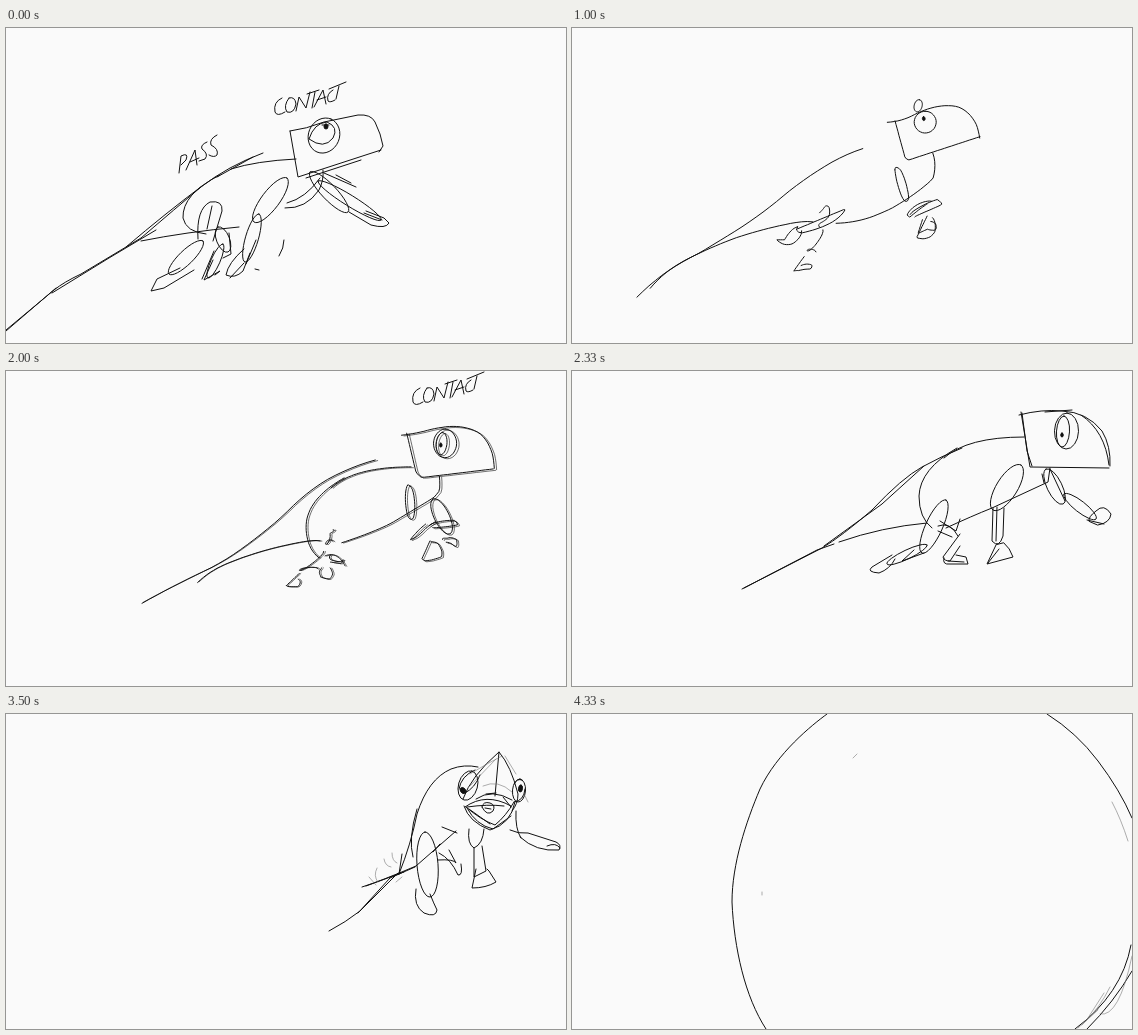
Animation of 560x315 px, one loop 4.5 s. Source, as an HTML page:

```html
<!DOCTYPE html>
<html lang="en">
<head>
<meta charset="utf-8">
<title>Lizard walk test</title>
<style>
html,body{margin:0;width:100%;height:100%;overflow:hidden;background:#fafafa}
svg{display:block;width:100vw;height:100vh}
path,ellipse{fill:none;stroke:#111;stroke-width:1;stroke-linecap:round;stroke-linejoin:round}
#dots{fill:#111}
#soft{stroke-width:.6}
#faint{stroke:#777;stroke-width:.6}
#tongue{fill:#fafafa}
</style>
</head>
<body>
<svg viewBox="0 0 560 315">
  <g id="lizard">
    <path id="soft"/><path id="ink"/><path id="dots"/><path id="faint"/>
  </g>
  <path id="tongueStem"/><ellipse id="tongue"/>
  <path id="contact" aria-label="CONTACT"/>
  <path id="pass" aria-label="PASS"/>
</svg>
<script>
const $ = id => document.getElementById(id);
const LOOP = 4500;

const CONTACT = 'M276 70Q267 74 269 84Q271 89 279 84M283 70Q277 78 281 84Q288 86 290 76Q289 68 283 70' +
  'M290 83L293 69L300 80L304 64M301 66L313 62M309 64L306 80M308 79L317 62L320 76M311 72L320 69' +
  'M327 62Q320 66 322 73Q324 75 329 72M323 61L340 54M333 58L330 71';
const PASS = 'M173 145L175 128Q183 124 180 132L175 137M180 142L189 122L191 137M184 134L193 130' +
  'M201 114Q194 117 196 121Q203 126 199 131L193 133M211 107Q203 111 205 117Q213 121 211 127Q208 130 203 127';

// Ellipse whose long axis runs between two points
function oval(x1, y1, x2, y2, w) {
  const dx = x2 - x1, dy = y2 - y1;
  const arc = `A${Math.hypot(dx, dy) / 2} ${w / 2} ${Math.atan2(dy, dx) * 180 / Math.PI} 1 1 `;
  return `M${x1} ${y1}${arc}${x2} ${y2}${arc}${x1} ${y1}Z`;
}

const poses = [
  {
    tail: 'M0 302L48 262Q58 254 75 246L135 210Q170 180 195 159Q222 138 257 125',
    under: 'M135 213Q180 204 233 199',
    back: 'M225 141Q250 133 290 131',
    rump: 'M214 147Q176 166 177 190Q180 204 200 206',
    belly: 'M279 180Q300 181 313 162Q318 152 317 142',
    head: 'M284 103L292 149L375 122',
    crown: 'M284 103Q300 101 318 94L352 87Q365 86 369 94Q375 106 377 118L373 124',
    eye: oval(325, 91, 311, 124, 31),
    pupil: oval(320, 96, 320, 101, 4),
    nearArm: oval(281, 150, 248, 194, 18),
    nearFore: oval(253, 186, 239, 234, 13),
    nearHand: 'M238 221Q222 235 220 247Q229 251 237 243L244 225',
    farArm: oval(304, 144, 342, 184, 15),
    farFore: oval(312, 153, 375, 192, 11),
    farHand: 'M343 184L365 197Q380 201 383 195L378 190L360 183',
    nearThigh: 'M192 211Q190 181 204 174Q217 172 216 183L207 213',
    nearShin: oval(197, 213, 163, 246, 14),
    nearFoot: 'M174 240L151 251L145 263L158 260L188 242',
    farThigh: oval(212, 199, 222, 224, 13),
    farShin: oval(217, 216, 202, 250, 9),
    farFoot: 'M207 232L198 252L214 243L209 247',
    more: 'M0 303L50 260M46 265L103 230L150 202M120 219Q160 185 196 158M211 149L247 129M300 150L355 132' +
      'M278 212Q278 220 273 228M249 241l4 1M281 175Q300 170 314 150M318 145L350 159M330 147L345 155' +
      'M223 205L225 226L217 230M196 251L208 223M250 212L240 236M358 185L376 192M206 178L201 201' +
      'M303 111Q308 95 321 94Q333 99 327 110Q318 122 303 111M316 97L323 97M224 250L238 235'
  },
  {
    tail: 'M22 297Q34 270 48 259Q58 248 106 225Q150 201 185 170Q200 155 216 145',
    under: 'M44 262Q70 240 130 215Q170 202 206 198',
    back: 'M205 152Q228 136 262 126Q285 119 297 119',
    rump: 'M215 145Q190 163 194 185Q196 195 205 198',
    belly: 'M227 204Q250 208 275 198Q315 187 332 165Q336 150 333 139',
    head: 'M294 101L303 148L379 122',
    crown: 'M288 103Q308 98 322 92Q346 85 362 97Q376 108 377 124',
    eye: oval(326, 92, 323, 116, 22),
    pupil: oval(326, 95, 327, 99, 3),
    nearArm: oval(291, 147, 264, 187, 18),
    nearFore: oval(268, 182, 265, 223, 12),
    nearHand: 'M260 220L249 238Q256 243 262 240Q270 232 270 221',
    farArm: 'M323 165Q324 178 335 185Q343 181 341 171L333 140',
    farFore: oval(333, 179, 373, 197, 14),
    farHand: 'M362 194L357 209L375 203L376 195L371 190',
    nearThigh: oval(214, 172, 215, 225, 20),
    nearShin: oval(219, 221, 191, 245, 14),
    nearFoot: 'M191 235Q180 248 180 253L197 254L192 245',
    more: 'M46 260Q60 250 80 237L110 225M189 168L216 145'
  },
  {
    tail: 'M96 249Q125 231 170 211Q215 183 250 152Q290 112 345 103',
    under: 'M103 259Q115 240 135 229Q180 205 240 192Q258 188 266 191',
    belly: 'M291 189Q330 182 350 165L382 140Q386 128 381 115',
    head: 'M344 87L356 122L429 99',
    crown: 'M335 88Q350 89 362 81Q385 68 405 68Q418 69 427 87L430 100',
    eye: oval(374, 77, 374, 97, 22),
    iris: oval(372, 81, 369, 93, 8),
    pupil: oval(370, 84, 370, 88, 2.5),
    nearArm: 'M346 138Q342 126 354 126Q363 128 389 158Q391 171 382 172Q374 170 346 138Z',
    nearFore: 'M418 172Q403 167 386 171L386 161Q405 152 426 167',
    nearHand: 'M424 165L414 189L420 189Q430 187 433 181Q432 169 426 167',
    farFore: 'M342 192Q352 172 361 157L370 160Q352 180 350 196',
    farHand: 'M342 190L338 203L347 198Q350 202 356 202Q356 194 350 196',
    nearThigh: 'M272 194Q270 152 282 152Q290 160 284 185L272 219',
    nearShin: 'M274 188L262 226',
    nearFoot: 'M262 224L250 241Q262 232 274 232Q276 226 270 224Q262 224 256 232',
    farShin: 'M250 208Q246 214 255 214Q290 206 298 190L250 210',
    farFoot: 'M250 208Q243 210 237 221L229 221Q236 228 245 225Q254 219 254 212',
    more: 'M353 123L370 117M363 93Q361 82 370 78M434 167L434 183L438 183M109 243L167 212'
  },
  {
    tail: 'M170 218L250 177Q270 165 300 139Q330 107 350 96Q370 85 390 77',
    under: 'M267 171Q310 156 355 152',
    back: 'M372 87Q395 66 452 66',
    rump: 'M385 77Q348 98 347 125Q347 147 360 157',
    belly: 'M374 157Q400 145 420 137L476 111L478 97',
    head: 'M449 41L458 96L537 97',
    crown: 'M447 44Q470 38 490 40Q515 41 530 60Q539 75 538 95',
    eye: oval(495, 42, 494, 78, 24),
    iris: oval(492, 45, 490, 76, 13),
    pupil: oval(490, 62, 490, 66, 2.5),
    nearArm: oval(449, 94, 421, 139, 21),
    nearFore: 'M421 137L420 170Q427 178 431 165L432 137',
    nearHand: 'M424 174L415 193L441 186Q438 177 432 172Z',
    farArm: oval(474, 98, 491, 133, 15),
    farFore: oval(492, 123, 524, 148, 11),
    farHand: 'M517 150Q516 146 524 140Q532 132 539 143Q538 152 526 154Z',
    nearThigh: oval(374, 129, 350, 182, 17),
    nearShin: oval(355, 174, 315, 193, 9),
    nearFoot: 'M320 184L300 196Q294 201 307 202Q318 198 323 188',
    farThigh: 'M366 155Q378 150 386 165',
    farShin: 'M388 163L371 186Q372 190 378 190L388 175',
    farFoot: 'M372 187Q370 194 378 193L396 193L394 186L384 184',
    more: 'M172 217L245 179L262 173M252 175L310 133L352 95M450 42L455 80L460 95M473 41L500 39' +
      'M509 44Q533 60 537 94M425 136L424 170M416 192L427 178M478 98L493 130M388 148L384 160L368 150' +
      'M352 182L330 190L342 179M470 103L472 112M515 149L532 153M376 190L392 191M366 160L380 166'
  },
  {
    tail: 'M238 182Q275 161 325 141L350 134Q380 110 405 92L438 66',
    under: 'M320 140Q360 136 402 138',
    back: 'M437 74Q452 58 470 59Q485 62 495 66',
    rump: 'M441 74Q395 100 394 138',
    belly: 'M460 125Q485 133 502 122Q512 115 510 100',
    head: 'M466 70Q482 87 489 110L553 55L560 38',
    crown: 'M466 72Q490 50 505 42Q530 28 553 32L560 40',
    eye: oval(507, 38, 502, 62, 21),
    pupil: oval(501, 45, 501, 50, 3),
    nearArm: oval(479, 89, 451, 139, 20),
    nearFore: 'M448 136L454 170L463 166L465 138',
    nearHand: 'M455 168Q452 183 460 183Q466 178 466 164',
    farArm: 'M501 122L504 131L510 130Q512 119 506 105',
    farFore: oval(505, 127, 542, 141, 11),
    farHand: 'M539 133Q545 122 550 130Q551 146 546 151Q536 152 535 147L541 139Z',
    nearThigh: oval(409, 121, 400, 165, 17),
    nearShin: 'M398 162L390 178L383 184L408 160',
    nearFoot: 'M385 178L373 192L386 190Q394 186 395 180',
    farThigh: 'M404 122Q428 150 436 181L433 168L413 126',
    farFoot: 'M423 176Q416 186 425 189Q436 188 437 180Q432 172 424 178',
    more: 'M267 171L322 143L348 135M358 125L416 84L438 62M432 82Q401 104 401 128M437 84Q455 72 472 68' +
      'M487 101L529 100M492 104Q520 72 560 46M490 108L524 73L556 50M495 46L526 27M552 31L549 52' +
      'M500 42L495 56Q502 64 512 59M440 185L438 170M413 141L435 135L427 144M460 67Q482 76 491 112' +
      'M468 122Q490 131 506 117M473 93L459 112M456 140L452 154M407 125L419 150L434 174M399 145L392 136' +
      'M372 193L393 169M512 122L546 128M425 176L423 187M457 169L460 180M534 33L557 30',
    faint: 'M488 106L480 76M482 63L527 35M478 116Q500 121 520 97M441 70Q458 65 488 69M397 132Q396 112 421 86' +
      'M496 92L540 62M500 100L548 55M480 113L525 98M484 70L491 92M455 75Q475 63 489 64'
  },
  {
    tail: 'M323 217Q340 208 354 197L392 159',
    under: 'M356 173Q375 167 410 152',
    back: 'M393 160Q405 130 411 100Q422 65 445 55Q458 50 472 53',
    rump: 'M411 95Q402 125 407 143',
    head: 'M458 92Q463 108 484 116Q505 110 509 88',
    crown: 'M457 85Q465 62 493 38Q505 52 512 80Q512 90 506 97',
    eye: oval(466, 57, 458, 86, 19),
    pupil: oval(455, 74, 459, 79, 5),
    eye2: oval(514, 65, 512, 88, 13),
    pupil2: oval(515, 71, 514, 78, 4),
    nearArm: 'M463 115Q461 130 468 134Q477 130 478 115',
    nearFore: 'M468 134L468 163L480 157L476 132',
    nearHand: 'M470 155L466 174Q480 174 490 168L483 157L481 155',
    farArm: 'M510 97Q509 115 515 124',
    farFore: 'M504 116Q512 120 522 119L550 128Q556 131 553 136Q530 138 514 123',
    farHand: 'M541 132Q550 128 554 134',
    nearThigh: oval(419, 118, 424, 183, 21),
    nearFoot: 'M410 175Q407 192 418 199Q430 204 431 196Q428 190 424 180',
    farThigh: 'M433 139Q445 145 452 161Q457 162 455 150',
    farFoot: 'M432 146Q448 145 450 149L443 136',
    more: 'M493 38L489 82M460 93Q475 106 489 111Q500 102 508 88M459 93Q480 78 505 92M461 93Q482 90 498 92' +
      'M461 94Q470 111 487 115L505 102M463 95L484 110M476 93Q477 87 484 89Q490 91 487 97Q481 103 476 93' +
      'M479 94L485 95M470 85Q486 74 506 86M453 75Q455 62 469 56M459 79Q469 74 474 61M508 70Q511 64 516 66' +
      'M508 88Q518 87 519 75M352 199L384 164L409 153M360 172L398 158M393 160L396 140M410 152L450 117' +
      'M436 113L451 119M427 138L434 130M480 80L490 79M497 83L505 93',
    faint: 'M371 154Q367 162 372 168M378 145Q379 152 385 153M386 139Q386 147 391 149M363 163L370 171' +
      'M390 168L396 163M464 72L490 45M464 60Q480 50 496 42M477 72Q492 65 506 78M499 42L510 60M519 82L522 88'
  },
  {
    tail: 'M255 0C240 11 205 39 188 75C174 108 160 150 160 188C162 234 173 283 194 315',
    back: 'M475 0Q505 19 526 47Q548 76 560 104',
    under: 'M559 231Q550 280 503 315',
    belly: 'M560 257Q542 288 515 315',
    faint: 'M540 88Q549 105 556 127M281 44l4 -4M190 178v3M510 311Q528 294 538 273M514 307L532 279' +
      'M528 300Q547 304 560 242M506 314L526 296'
  }
];

// start ms, pose, blend to the next pose, options
const steps = [
  [0, 0, 0, {label: [0, 0], pass: true}],
  [160, 0, .3], [330, 0, .7], [500, 1, 0],
  [660, 1, .2, {label: [40, -15], rough: true}],
  [830, 1, .33], [1000, 1, .58], [1160, 1, .74],
  [1330, 1, .88, {label: [84, -52], rough: true}],
  [1500, 2, 0], [1660, 2, .2], [1830, 2, .36],
  [2000, 2, .54, {label: [138, -53], rough: true}],
  [2160, 2, .76], [2330, 3, 0],
  [2500, 3, .36, {label: [196, -53], rough: true}],
  [3000, 4, 0], [3160, 4, .35, {rough: true}], [3330, 4, .7], [3500, 5, 0],
  [3660, 5, 0, {move: 'translate(33 -3) scale(.94 1)'}],
  [3830, 5, 0, {move: 'translate(33 -3) scale(.94 1)', tongue: [476, 232, 24], stem: 'M480 92Q466 150 470 212M487 94Q478 150 482 212'}],
  [4160, 5, 0, {move: 'translate(33 -3) scale(.94 1)', tongue: [440, 160, 92]}],
  [4245, 6, 1, {tongue: [362, 172, 217]}],
  [4330, 6, 0]
];

const SAMPLES = 32;
const probe = document.createElementNS('http://www.w3.org/2000/svg', 'path');

function sample(d) {
  probe.setAttribute('d', d);
  const len = probe.getTotalLength();
  return Array.from({length: SAMPLES + 1}, (_, i) => {
    const p = probe.getPointAtLength(len * i / SAMPLES);
    return [p.x, p.y];
  });
}

const toPath = pts => 'M' + pts.map(p => p.map(v => v.toFixed(1)).join(' ')).join('L');
const mix = (a, b, t) => a.map((p, i) => [p[0] + (b[i][0] - p[0]) * t, p[1] + (b[i][1] - p[1]) * t]);

// A part drawn in only one pose rides along with the hip
function blendPart(a, b, name, t) {
  if (a[name] && b[name]) return toPath(mix(sample(a[name]), sample(b[name]), t));
  const own = t < .5 ? a : b;
  if (!own[name]) return '';
  const hipA = sample(a.nearThigh), hipB = sample(b.nearThigh);
  const hip = mix(hipA, hipB, t)[0], from = (own === a ? hipA : hipB)[0];
  return toPath(sample(own[name]).map(p => [p[0] + hip[0] - from[0], p[1] + hip[1] - from[1]]));
}

function build([at, index, t, opt = {}]) {
  const out = {at, opt, ink: '', dots: '', faint: ''};
  if (t === 1) return out;
  const a = poses[index], b = poses[index + 1];
  const names = t ? new Set([...Object.keys(a), ...Object.keys(b)]) : Object.keys(a);
  for (const name of names) {
    if (t && (name === 'more' || name === 'faint')) continue;
    const layer = name === 'faint' ? 'faint' : name.startsWith('pupil') ? 'dots' : 'ink';
    out[layer] += t ? blendPart(a, b, name, t) : a[name];
  }
  return out;
}

const frames = steps.map(build);
$('soft').setAttribute('transform', 'translate(3 -2) rotate(.4)');
$('contact').setAttribute('d', CONTACT);
$('pass').setAttribute('d', PASS);

const show = (id, on) => $(id).setAttribute('visibility', on ? 'visible' : 'hidden');

function draw(f) {
  const {label, pass, rough, move, tongue, stem} = f.opt;
  for (const id of ['ink', 'dots', 'faint']) $(id).setAttribute('d', f[id]);
  $('soft').setAttribute('d', rough ? f.ink : '');
  $('lizard').setAttribute('transform', move || '');
  show('contact', label);
  show('pass', pass);
  show('tongue', tongue);
  if (label) $('contact').setAttribute('transform', `translate(${label})`);
  $('tongueStem').setAttribute('d', stem || '');
  if (tongue) {
    const [cx, cy, r] = tongue;
    Object.entries({cx, cy, rx: r, ry: r * 1.05}).forEach(([k, v]) => $('tongue').setAttribute(k, v));
  }
}

const start = performance.now();
let shown;
function tick() {
  const time = (performance.now() - start) % LOOP;
  const f = frames.findLast(s => s.at <= time);
  if (f !== shown) draw(shown = f);
  requestAnimationFrame(tick);
}
tick();
</script>
</body>
</html>
```
